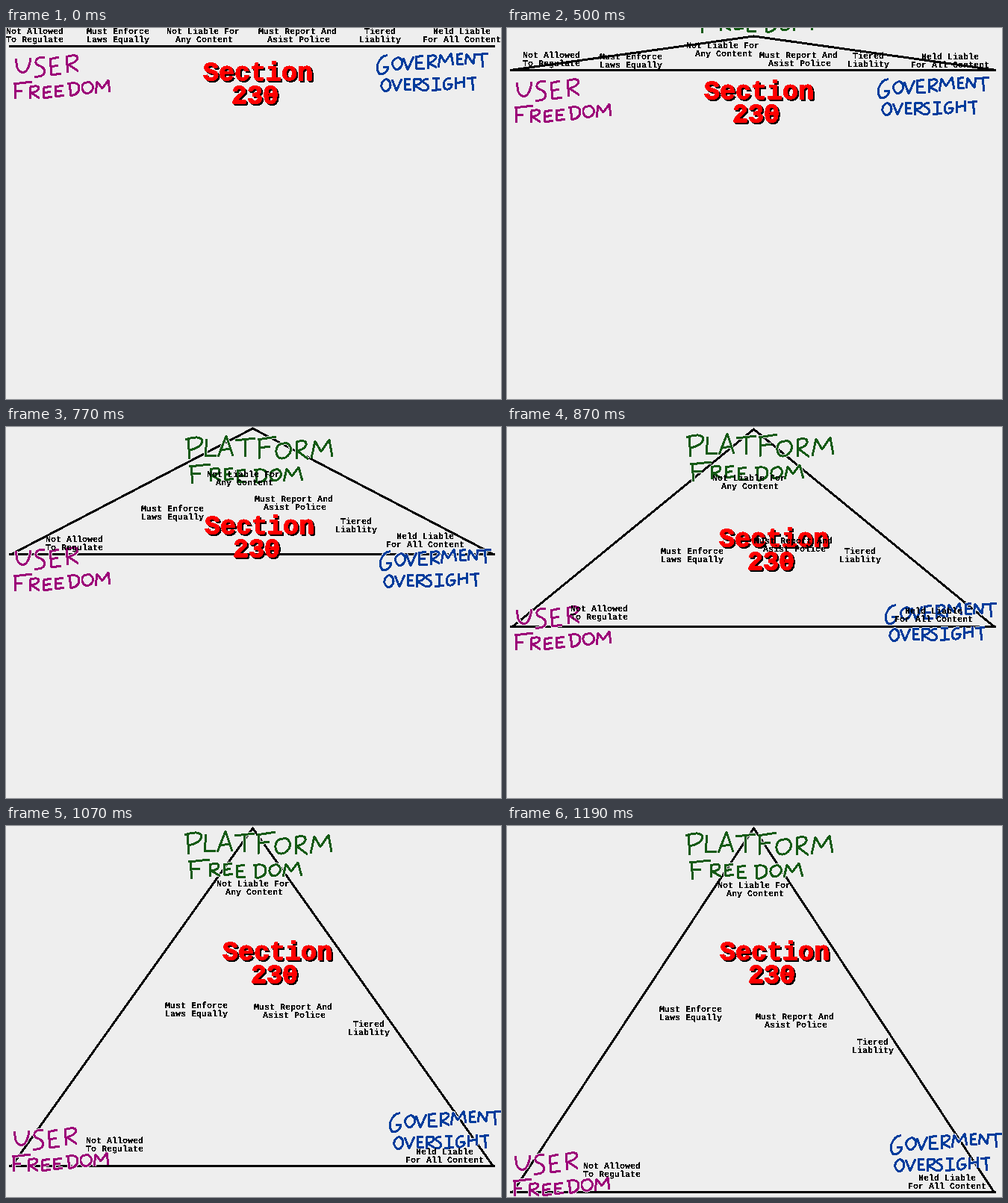
These frames come from a looping animation (663 px wide and 497 px high, 3.19 s). An HTML page:

```html
<!DOCTYPE html>
<html lang="en">
<head>
<meta charset="utf-8">
<title>Section 230</title>
<style>
  html, body { margin: 0; width: 100%; height: 100%; overflow: hidden; background: #eee; }
  svg { display: block; width: 100%; height: 100%; }
  text { font-family: "Liberation Mono", "DejaVu Sans Mono", monospace; font-weight: bold;
         white-space: pre; text-rendering: geometricPrecision; filter: url(#crisp); }
  .label text { font-size: 11.667px; }
  .title text { font-size: 35px; stroke-width: 1.2; }
  path { fill: none; stroke-width: 3; stroke-linejoin: round; shape-rendering: crispEdges; }
  .halo { stroke: #eee; stroke-width: 5; }
</style>
</head>
<body>
<svg id="stage" viewBox="0 0 663 497">
  <defs>
    <filter id="crisp" color-interpolation-filters="sRGB" x="-5%" y="-20%" width="110%" height="140%">
      <feComponentTransfer><feFuncA type="discrete" tableValues="0 0 1 1 1"/></feComponentTransfer>
    </filter>
  </defs>
</svg>
<script>
const stage = document.getElementById('stage');
const LOOP = 3190;

// [start in ms, position along the pose list]
const STEPS = [[0, 0], [500, 1], [650, 2], [770, 3], [870, 3.48], [970, 4], [1070, 4.7], [1190, 5]];

const add = (parent, tag, attrs = {}, content = '') => {
  const el = document.createElementNS('http://www.w3.org/2000/svg', tag);
  for (const key in attrs) el.setAttribute(key, attrs[key]);
  el.textContent = content;
  return parent.appendChild(el);
};

const movers = [];
const group = (className, poses) => {
  const el = add(stage, 'g', { class: className });
  movers.push({ poses, show: (x, y) => el.setAttribute('transform', `translate(${x} ${y})`) });
  return el;
};

// Triangle: each pose is [base height, apex height]
const triangle = add(stage, 'path', { stroke: '#000' });
movers.push({
  poses: [[24, 24], [56, 11], [105, 4], [170, 2], [373, 4], [490, 3]],
  show: (base, apex) => triangle.setAttribute('d',
    `M4 ${base}.5H655M8 ${base}L330.5 ${apex}L652 ${base}`)
});

// Handwritten words
const scrawl = (color, poses, strokes) => {
  const el = group('scrawl', poses);
  const d = strokes.join('');
  add(el, 'path', { class: 'halo', d });
  add(el, 'path', { stroke: color, d });
};

scrawl('#145a14', [[13, -120], [13, -65], [8, -33], [1, 4], [0, -3], [0, 0]], [
  'M243 12L245 39M239 13Q260 6 262 15Q261 23 245 27',
  'M268 12L266 35L281 34',
  'M283 36L294 8L303 35M287 27L299 25',
  'M306 14L333 11M319 13L320 36',
  'M339 12L338 39M336 13L361 9M338 24L353 22',
  'M371 18Q360 19 361 30Q363 41 373 37Q382 32 380 23Q377 16 371 18',
  'M388 39L388 16Q402 12 401 20Q399 26 389 28L404 39',
  'M408 38L413 15L421 29L432 13L436 36',
  'M247 49L249 72M244 49L273 46M248 59L260 58',
  'M273 53L274 69M272 53Q285 49 285 55Q284 60 275 61L287 68',
  'M292 53L293 67L304 65M291 53L303 51M292 60L301 58',
  'M309 55L310 70L321 69M308 55L320 53M309 62L318 61',
  'M334 54L335 71M331 54Q348 50 348 60Q348 69 335 71',
  'M360 53Q352 55 353 62Q355 70 362 67Q369 63 367 57Q364 51 360 53',
  'M371 69L375 52L382 62L391 50L396 68'
]);

scrawl('#9c0078', [[0, 0], [0, 32], [0, 76], [0, 125], [-1, 290], [-2, 401]], [
  'M13 41L15 53Q18 61 25 59Q31 56 33 40',
  'M52 40Q42 38 40 44Q39 49 46 51Q54 55 51 61Q48 66 38 65',
  'M59 41L61 63L74 61M58 42L71 39M60 52L70 50',
  'M81 39L83 60M80 39Q95 34 96 40Q96 45 84 49L97 58',
  'M12 76L13 95M10 75L35 72M12 85L22 84',
  'M32 79L33 95M32 79Q44 76 44 81Q43 85 34 87L45 94',
  'M50 80L51 94L62 92M50 80L61 78M51 87L60 85',
  'M66 79L67 92L78 90M65 79L77 77M66 85L75 84',
  'M85 74L87 91M82 75Q98 71 98 80Q98 89 86 91',
  'M108 73Q101 74 102 81Q104 89 111 87Q118 84 116 77Q113 71 108 73',
  'M120 88L122 72L129 81L137 70L139 86'
]);

scrawl('#003c9c', [[0, 0], [0, 32], [0, 77], [4, 130], [16, 279], [17, 378]], [
  'M511 37Q503 36 498 48Q496 62 503 62Q511 60 512 52L505 52',
  'M524 40Q516 43 518 50Q521 58 526 55Q533 49 530 43Q527 39 524 40',
  'M532 40L538 56L546 38',
  'M549 39L550 55L561 54M548 39L559 37M549 47L558 46',
  'M565 38L565 55M564 38Q577 35 576 40Q574 45 566 47L577 53',
  'M579 53L582 36L588 46L596 34L599 50',
  'M604 36L605 49L613 48M603 36L612 34M604 42L611 41',
  'M615 49L617 35L626 48L628 34',
  'M628 36L646 34M637 35L639 53',
  'M508 69Q502 72 503 79Q506 87 511 84Q517 79 514 72Q511 68 508 69',
  'M517 69L523 84L530 68',
  'M534 69L535 83L543 82M533 69L542 68M534 76L541 75',
  'M547 85L546 69Q557 66 556 72Q554 76 547 77L557 83',
  'M566 68Q558 68 559 73Q566 76 566 80Q564 85 557 83',
  'M571 68L581 67M576 68L577 83M570 84L583 82',
  'M596 68Q588 66 586 75Q586 83 592 82Q598 80 597 75L591 75',
  'M602 66L603 82M613 65L614 80M602 74L613 72',
  'M617 68L630 66M624 67L626 84'
]);

// Title with a hard shadow
const title = group('title', [[264, 58], [264, 83], [264, 117], [266, 131], [303, 166], [285, 167]]);
for (const [shift, color] of [[2, '#000'], [0, '#f00']]) {
  const paint = { fill: color, stroke: color };
  add(title, 'text', { x: shift, y: 12 + shift, ...paint }, 'Section');
  add(title, 'text', { x: 38 + shift, y: 43 + shift, ...paint }, '230');
}

// Two-line labels: text, indent of each line, poses
const label = (top, topIndent, bottom, bottomIndent, poses) => {
  const el = group('label', poses);
  add(el, 'text', { x: topIndent, y: 4 }, top);
  add(el, 'text', { x: bottomIndent, y: 15 }, bottom);
};

label('Not Allowed', 0, 'To Regulate', 0,
  [[0, 4], [21, 36], [53, 85], [53, 150], [119, 343], [102, 455]]);
label('Must Enforce', 0, 'Laws Equally', 0,
  [[108, 4], [124, 38], [147, 84], [181, 109], [234, 227], [204, 245]]);
label('Not Liable For', 0, 'Any Content', 12,
  [[215, 4], [240, 23], [259, 40], [269, 63], [281, 73], [282, 79]]);
label('Must Report And', 0, 'Asist Police', 12,
  [[338, 4], [338, 36], [352, 62], [333, 96], [328, 213], [333, 255]]);
label('Tiered', 7, 'Liablity', 0,
  [[473, 4], [456, 37], [439, 84], [441, 126], [449, 209], [462, 289]]);
label('Held Liable', 14, 'For All Content', 0,
  [[558, 4], [541, 38], [519, 87], [509, 146], [530, 355], [537, 471]]);

const render = position => {
  const from = Math.floor(position);
  const part = position - from;
  for (const { poses, show } of movers) {
    const a = poses[from];
    const b = poses[from + 1] || a;
    show(...a.map((value, i) => Math.round(value + (b[i] - value) * part)));
  }
};

let shown = -1;
const tick = () => {
  const time = performance.now() % LOOP;
  const position = STEPS.filter(([start]) => start <= time).pop()[1];
  if (position !== shown) render(shown = position);
  requestAnimationFrame(tick);
};
tick();
</script>
</body>
</html>
```
